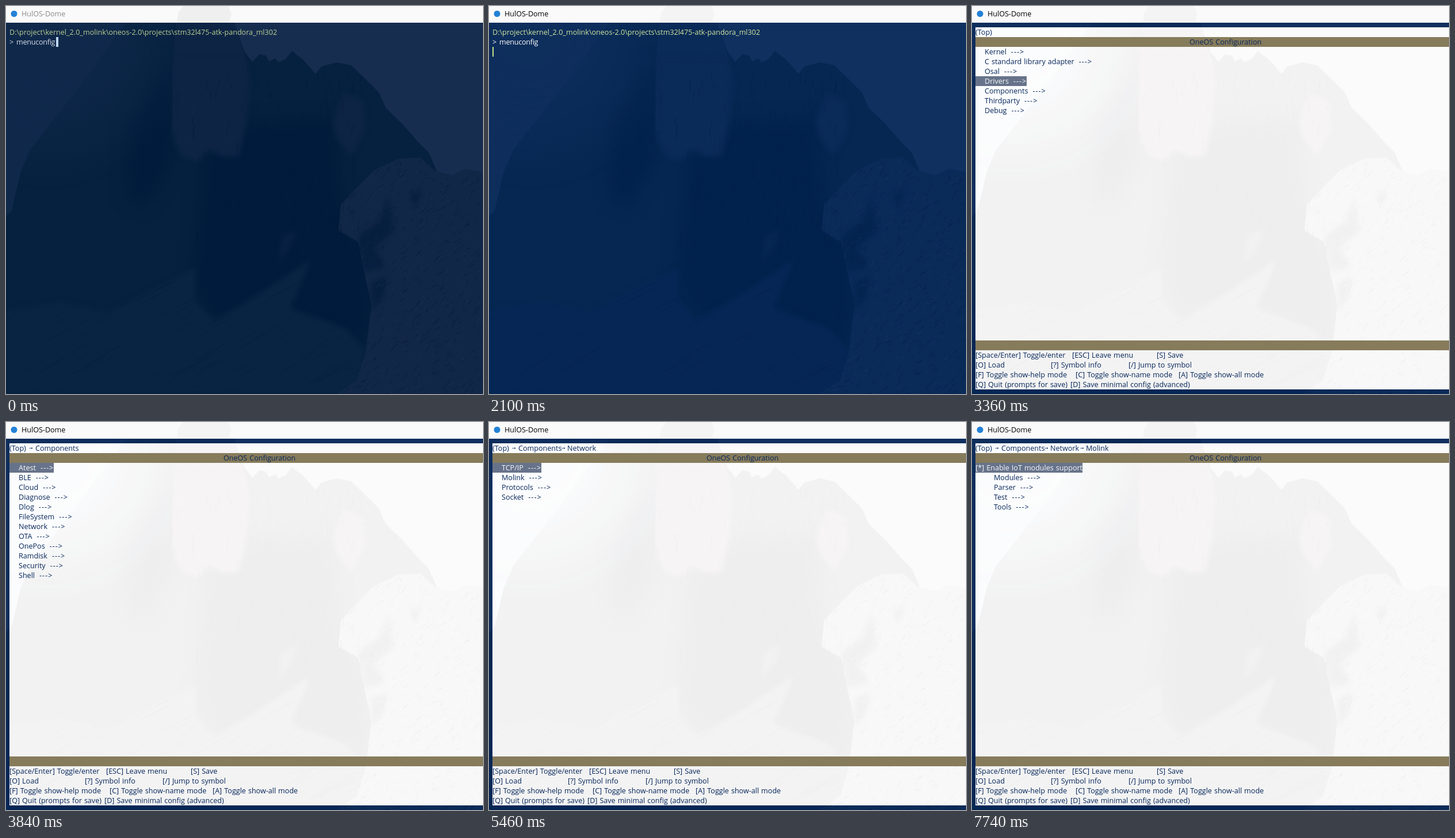
An HTML page for the animation above (8 s loop, 829 by 674 pixels).

```html
<!DOCTYPE html>
<html lang="en">
<head>
<meta charset="utf-8">
<title>Terminal menu</title>
<style>
  html, body { margin: 0; width: 100%; height: 100%; overflow: hidden; }
  #stage {
    position: relative; width: 829px; height: 674px; overflow: hidden;
    font: 12.57px/17px "Open Sans", "Noto Sans", sans-serif;
    word-spacing: .75px; white-space: pre;
    --sky: #10305f; --fog: #0e2e5c; --face: #052751; --dark: #01224c; --tower: #0a2a57;
    --talus: #062756; --rock: #0a2a58; --crack: #001d46; --glint: #183964;
    --path: #cfe8a0; --prompt: #fff; --title: #000; --lump: #f4f4f4;
  }
  #stage.idle {
    --sky: #172d50; --fog: #10294b; --face: #06203f; --dark: #011b3c; --tower: #0d2445;
    --talus: #092443; --rock: #112747; --crack: #031838; --glint: #1c3152;
    --path: #b9cf92; --prompt: #d6dde6; --title: #8b8b8b; --lump: #f0efef;
  }
  #panel {
    --sky: #fbfbfb; --fog: #fbfcfd; --face: #f2f2f2; --dark: #eeeeef; --tower: #f6f4f5;
    --talus: #f3f3f3; --rock: #f9f8f9; --crack: #e9e9eb; --glint: #fcfbfc;
    left: 6px; top: 37px; width: 823px; height: 629px; overflow: hidden; color: #06265a;
  }
  #stage svg, #stage div, .at { position: absolute; }
  svg, #help, #content { left: 0; top: 0; }
  #panel svg { left: -6px; top: -37px; }
  #bar { left: 0; top: 0; width: 829px; height: 29px; background: #fafafa; }
  #bar .at { left: 27px; top: 5px; color: var(--title); }
  #path { left: 6px; top: 37px; color: var(--path); }
  #prompt, #command { top: 54px; color: var(--prompt); }
  #prompt { left: 6px; }
  #command { left: 18px; letter-spacing: -.25px; }
  #cursor { height: 17px; width: 2px; background: #c3e587; }
  .idle #cursor { width: 4px; background: #bdd4f5; }
  .band { left: 0; width: 823px; height: 17px; background: #867b5b; }
  .row { left: 0; }
  .row span { display: inline-block; height: 17px; }
  .row .on { background: #67738a; color: #f6f8fb; }
  .row i { font-style: normal; letter-spacing: 1px; }
  .arrow { font: 8px/17px "DejaVu Sans", sans-serif; }
</style>
</head>
<body>
<div id="stage">
  <svg width="829" height="674">
    <defs>
      <radialGradient id="fade" gradientUnits="userSpaceOnUse" cx="70" cy="50" r="270">
        <stop offset=".2" stop-color="#fff"/>
        <stop offset="1" stop-color="#fff" stop-opacity="0"/>
      </radialGradient>
      <mask id="fog" maskUnits="userSpaceOnUse" x="0" y="0" width="829" height="674">
        <path fill="url(#fade)" d="M0 0H829V674H0Z"/>
      </mask>
      <filter id="soft" x="-20%" y="-20%" width="140%" height="140%" color-interpolation-filters="sRGB"><feGaussianBlur stdDeviation="14"/></filter>
      <filter id="blunt" color-interpolation-filters="sRGB"><feGaussianBlur stdDeviation="4"/></filter>
      <path id="rockShape" d="M578 390L582 345 610 315 640 285 682 265 720 263 745 286 775 294 798 283 829 288V674H575L610 650 625 600 635 520 620 450 612 410Z"/>
      <path id="talusShape" d="M0 528L100 514 175 532 330 455 328 510 360 547 440 500 530 440 495 526 590 560 625 600 610 674H0Z"/>
      <clipPath id="inRock"><use href="#rockShape"/></clipPath>
      <clipPath id="inTalus"><use href="#talusShape"/></clipPath>
      <g id="mountain" fill="none">
        <path fill="var(--sky)" d="M0 0H829V674H0Z"/>
        <path fill="var(--fog)" d="M0 0H297V400H0Z"/>
        <path fill="var(--face)" d="M0 365L10 355 25 290 42 250 120 150 230 0H388L400 40 415 80 428 97 440 84 452 86 457 96 468 91 474 98 486 92 497 78 504 84 515 92 528 106 538 118 548 105 575 98 600 103 628 130 648 150 660 177 690 206 715 235 735 255 750 290V674H0Z"/>
        <path fill="var(--dark)" filter="url(#soft)" d="M215 200L285 90 290 270 240 350 210 330ZM430 200L570 195 580 330 635 450 630 590 500 540 360 545 325 480 345 260Z"/>
        <path fill="var(--fog)" mask="url(#fog)" d="M0 0H293V360H0Z"/>
        <path fill="var(--tower)" d="M297 0H388L400 40 414 82 420 120 330 190 289 220 290 100Z"/>
        <path fill="var(--tower)" filter="url(#blunt)" d="M294 90L416 90 424 130 418 200 405 262 378 262 352 250 335 270 308 262 292 235ZM585 150L622 165 625 215 600 262 575 230 568 200Z"/>
        <path fill="var(--tower)" opacity=".6" filter="url(#blunt)" d="M478 400L505 388 498 415 474 448Z"/>
        <use href="#talusShape" fill="var(--talus)" filter="url(#blunt)"/>
        <use href="#rockShape" fill="var(--rock)"/>
        <path fill="var(--dark)" opacity=".65" filter="url(#blunt)" d="M612 400L650 372 665 330 674 392 640 420 660 455 622 462ZM700 330L722 318 712 348ZM635 480L662 470 656 505 636 530Z"/>
        <path id="strata" stroke="var(--crack)" opacity=".45"/>
        <path id="ribs" stroke="var(--glint)" opacity=".22"/>
        <path id="scree" stroke="var(--crack)" opacity=".4" clip-path="url(#inTalus)"/>
        <path id="chips" stroke="var(--crack)" opacity=".65" clip-path="url(#inRock)"/>
        <path id="glints" stroke="var(--glint)" opacity=".6" clip-path="url(#inRock)"/>
      </g>
    </defs>
    <use href="#mountain"/>
  </svg>
  <div id="bar">
    <svg width="829" height="29">
      <path fill="var(--lump)" d="M297 29L299 12 308 0H386L392 14 387 29Z"/>
      <circle cx="14" cy="13.5" r="5.5" fill="#2381d6"/>
    </svg>
    <span class="at">HulOS-Dome</span>
  </div>
  <div id="path">D:\project\kernel_2.0_molink\oneos-2.0\projects\stm32l475-atk-pandora_ml302</div>
  <div id="prompt">&gt;</div>
  <div id="command">menuconfig</div>
  <div id="cursor"></div>
  <div id="panel">
    <svg width="829" height="674"><use href="#mountain"/></svg>
    <div class="band" style="top:17px"><span class="at" style="left:372px">OneOS Configuration</span></div>
    <div class="band" style="top:544px"></div>
    <div id="help"></div>
    <div id="content"></div>
  </div>
</div>
<script>
const $ = id => document.getElementById(id);

// Seeded strokes for the rock texture
let seed = 7;
const rand = (a, b) => {
  seed = (seed * 16807) % 2147483647;
  return a + (b - a) * seed / 2147483647;
};
function strokes(id, count, [x0, y0, x1, y1], dx, dy) {
  let d = '';
  for (let i = 0; i < count; i++) {
    const k = rand(.3, 1);
    d += `M${rand(x0, x1) | 0} ${rand(y0, y1) | 0}l${(dx * k + rand(-3, 3)).toFixed(1)} ${(dy * k + rand(-3, 3)).toFixed(1)}`;
  }
  $(id).setAttribute('d', d);
}
strokes('strata', 130, [300, 110, 620, 420], -2, 26);
strokes('ribs', 90, [295, 40, 420, 260], 3, 18);
strokes('scree', 120, [0, 480, 610, 674], 75, -42);
strokes('chips', 420, [580, 265, 829, 674], -9, 9);
strokes('glints', 260, [580, 265, 829, 674], -8, 7);

const at = (x, y, text, cls = '') =>
  `<span class="at ${cls}" style="left:${x}px;top:${y}px">${text}</span>`;

const help = [
  [[0, '[Space/Enter] Toggle/enter'], [168, '[ESC] Leave menu'], [315, '[S] Save']],
  [[0, '[O] Load'], [131, '[?] Symbol info'], [266, '[/] Jump to symbol']],
  [[0, '[F] Toggle show-help mode'], [174, '[C] Toggle show-name mode'], [353, '[A] Toggle show-all mode']],
  [[0, '[Q] Quit (prompts for save)'], [165, '[D] Save minimal config (advanced)']]
];
$('help').innerHTML = help.map((line, i) =>
  line.map(([x, text]) => at(x, 561 + 17 * i, text)).join('')).join('');

const crumbs = [[0, '(Top)'], [45, 'Components'], [130, 'Network'], [192, 'Molink']];
const arrows = [34, 120, 182];
const toggle = mark => `[${mark}] Enable IoT modules support`;
const menus = {
  top: { depth: 1, items: ['Kernel', 'C standard library adapter', 'Osal', 'Drivers', 'Components', 'Thirdparty', 'Debug'] },
  components: { depth: 2, items: ['Atest', 'BLE', 'Cloud', 'Diagnose', 'Dlog', 'FileSystem', 'Network', 'OTA', 'OnePos', 'Ramdisk', 'Security', 'Shell'] },
  network: { depth: 3, items: ['TCP/IP', 'Molink', 'Protocols', 'Socket'] },
  molinkOff: { depth: 4, head: toggle(' '), items: [] },
  molinkOn: { depth: 4, head: toggle('*'), items: ['Modules', 'Parser', 'Test', 'Tools'] }
};

// Terminal steps hold the cursor place, menu steps the selected row
const steps = [
  [0, 'idle', [87, 54]], [1020, 'shell', [87, 54]], [1560, 'shell', null],
  [2040, 'shell', [87, 54]], [2100, 'shell', [6, 71]],
  [2520, 'top', 0], [3060, 'top', 1], [3180, 'top', 2], [3360, 'top', 3], [3540, 'top', 4],
  [3840, 'components', 0], [4380, 'components', 1], [4560, 'components', 2], [4680, 'components', 3],
  [4860, 'components', 4], [5040, 'components', 5], [5220, 'components', 6],
  [5460, 'network', 0], [6060, 'network', 1],
  [6420, 'molinkOff', 0], [7740, 'molinkOn', 0]
];
const LOOP = 8000;

function menuHtml({ depth, head, items }, selected) {
  const indent = head ? 32 : 16;
  const rows = items.map(name => [indent, `${name}  <i>---&gt;</i>`]);
  if (head) rows.unshift([0, head]);
  const trail = crumbs.slice(0, depth).map(([x, text], i) =>
    (i ? at(arrows[i - 1], 0, '→', 'arrow') : '') + at(x, 0, text)).join('');
  return trail + rows.map(([pad, text], i) =>
    `<div class="row" style="top:${34 + 17 * i}px"><span class="${i === selected ? 'on' : ''}" style="padding-left:${pad}px">${text}</span></div>`).join('');
}

function show([, screen, detail]) {
  const menu = menus[screen];
  $('stage').className = screen;
  $('panel').style.display = menu ? 'block' : 'none';
  $('cursor').style.display = !menu && detail ? 'block' : 'none';
  if (menu) {
    $('content').innerHTML = menuHtml(menu, detail);
  } else if (detail) {
    $('cursor').style.left = detail[0] + 'px';
    $('cursor').style.top = detail[1] + 'px';
  }
}

const start = performance.now();
let current;
function tick() {
  const t = (performance.now() - start) % LOOP;
  const step = steps.findLast(s => s[0] <= t);
  if (step !== current) show(current = step);
  requestAnimationFrame(tick);
}
tick();
</script>
</body>
</html>
```
